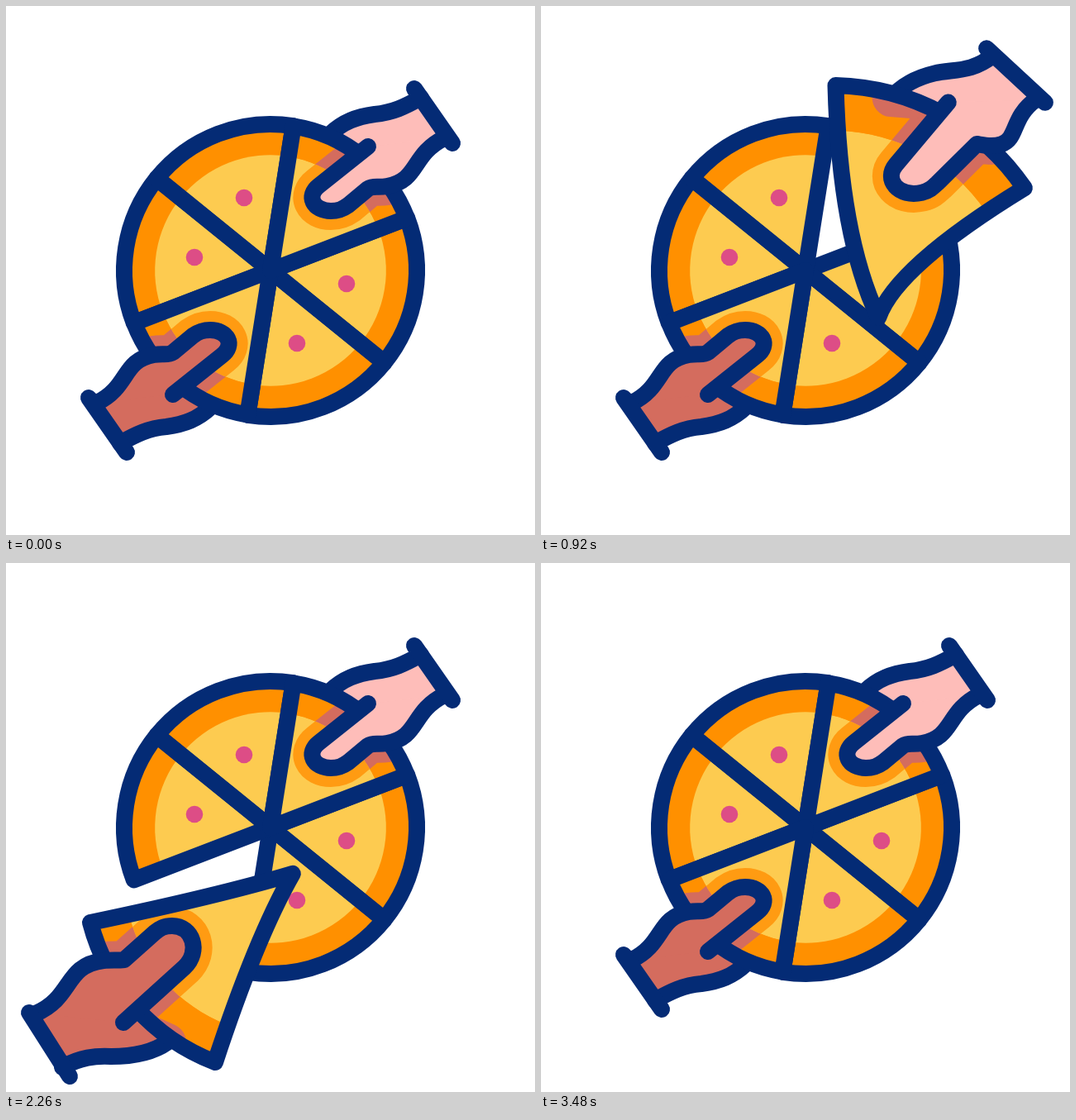
Animation of 640x640 px, one loop 3.6 s. Source, as an HTML page with a canvas:

```html
<!DOCTYPE html>
<html lang="en">
<head>
<meta charset="utf-8">
<title>Sharing a pizza</title>
<style>
html, body { margin: 0; width: 100%; height: 100%; overflow: hidden; background: #fff; }
canvas { display: block; width: 100vw; height: 100vh; }
</style>
</head>
<body>
<canvas width="640" height="640"></canvas>
<script>
const ctx = document.querySelector('canvas').getContext('2d');
const NAVY = '#042b75', CRUST = '#ff9000', CHEESE = '#fdcb50', GLOW = '#ff9b12';
const TAN = '#d46c5e', PINK = '#febdb9', TOPPING = '#dd4d86';
const LOOP = 3600, HALF = 1800, R = 177, INNER = 0.79;
const RAD = Math.PI / 180;

// Points: back of hand (7), cuff (2), thumb and palm (15), slice corners (2)
const REST = [
  392,155, 408,140, 424,134, 446,131, 468,129, 482,122, 502,111,
  494,100, 540,166,
  438,170, 379,217, 362,230, 372,248, 393,248, 402,248, 407,246, 414,241,
  438,221, 444,217, 450,220, 461,218, 500,211, 490,180, 530,160,
  347.6,145.5, 485,256.7];
const PULL_A = [
  424,84, 440,72, 460,67, 482,67, 505,67, 525,77, 556,62,
  550,52, 604,132,
  490,105, 411,164, 392,178, 405,204, 434,204, 443,204, 448,201, 455,197,
  512,162, 522,166, 530,170, 541,169, 562,167, 560,140, 594,126,
  362,54, 556,227];
const PULL_B = [
  445,60, 462,48, 485,43, 513,43, 532,44, 550,42, 572,30,
  563,19, 612,96,
  498,84, 424,151, 404,170, 414,201, 439,201, 449,201, 454,198, 460,193,
  497,160, 505,159, 513,160, 522,159, 570,153, 558,115, 604,95,
  387,36, 538,205];

// time, pull, turn, shift x, shift y, tip x, tip y
const KEYS_A = [
  [0, 0, 0, 0, 0, 0, 0],
  [200, .6, 0, 0, 0, 10, 45],
  [380, 1, 0, 0, 0, 23, 31],
  [600, 1, 4, -3, -27, -20, 10],
  [920, 1, -13.2, -2.5, -8, 45, 21],
  [1080, 1, -12, -3, -7, -20, -14],
  [1340, .62, 0, 2, -2, -15, -7],
  [1520, 0, 0, 0, 0, 0, 0]];
const KEYS_B = [
  [0, 0, 0, 0, 0, 0, 0],
  [230, .55, 0, 0, 0, -5, 75],
  [460, 1, 0, 0, 0, -23, 13],
  [600, 1, 0, 0, -4, -26, 4],
  [1080, 1, -12.2, 0, -1, -26, 17],
  [1340, .62, 0, 2, -2, -15, -7],
  [1520, 0, 0, 0, 0, 0, 0]];

const CRUMBS = [[320,252, 267,219], [320,276, 231,262], [312,290, 262,318]];
const DOTS = [[288,232], [228,304], [412,336], [352,408]];

const mix = (a, b, k) => a + (b - a) * k;
const mixPt = (p, q, k) => [mix(p[0], q[0], k), mix(p[1], q[1], k)];

// Monotone cubic through the keys
function sample(keys, t, c) {
  const last = keys.length - 1;
  if (t <= 0 || t >= keys[last][0]) return 0;
  let i = 0;
  while (t >= keys[i + 1][0]) i++;
  const slope = j => (keys[j + 1][c] - keys[j][c]) / (keys[j + 1][0] - keys[j][0]);
  const tangent = j => {
    if (j === 0 || j === last) return 0;
    const a = slope(j - 1), b = slope(j);
    return a * b <= 0 ? 0 : 2 * a * b / (a + b);
  };
  const h = keys[i + 1][0] - keys[i][0], u = (t - keys[i][0]) / h;
  const a = keys[i][c], b = keys[i + 1][c], s = u * u * (3 - 2 * u);
  return mix(a, b, s) + h * u * (1 - u) * (tangent(i) * (1 - u) - tangent(i + 1) * u);
}

function posePoints(pull, m, turn, dx, dy) {
  const px = (pull[14] + pull[16]) / 2, py = (pull[15] + pull[17]) / 2;
  const c = Math.cos(turn * RAD), s = Math.sin(turn * RAD), pts = [];
  for (let i = 0; i < REST.length; i += 2) {
    const x = mix(REST[i], pull[i], m) - px, y = mix(REST[i + 1], pull[i + 1], m) - py;
    pts.push([px + dx + x * c - y * s, py + dy + x * s + y * c]);
  }
  return pts;
}

function curve(path, pts, ...from) {
  for (const i of from) path.bezierCurveTo(...pts[i], ...pts[i + 1], ...pts[i + 2]);
}

function bulge(path, p, q, angle) {
  const dx = (q[0] - p[0]) * .357, dy = (q[1] - p[1]) * .357;
  const c = Math.cos(angle * RAD), s = Math.sin(angle * RAD);
  path.bezierCurveTo(
    p[0] + dx * c + dy * s, p[1] - dx * s + dy * c,
    q[0] - dx * c + dy * s, q[1] - dx * s - dy * c, ...q);
}

function fill(path, color) {
  ctx.fillStyle = color;
  ctx.fill(path);
}

function stroke(path, color = NAVY, width = 20) {
  if (width <= 0) return;
  ctx.strokeStyle = color;
  ctx.lineWidth = width;
  ctx.stroke(path);
}

function line(p, q) {
  const path = new Path2D();
  path.moveTo(...p);
  path.lineTo(...q);
  return path;
}

function sector(r, start) {
  const path = new Path2D();
  path.moveTo(320, 320);
  path.arc(320, 320, r, start * RAD, (start + 60) * RAD);
  path.closePath();
  return path;
}

function drawPizza() {
  const starts = [-21, 39, 159, 219];
  for (const a of starts) {
    fill(sector(R, a), CRUST);
    fill(sector(R * INNER, a), CHEESE);
  }
  for (const a of starts) stroke(sector(R, a));
  for (const [x, y] of DOTS) {
    const dot = new Path2D();
    dot.arc(x, y, 10.3, 0, 7);
    fill(dot, TOPPING);
  }
}

function drawCrumbs(t, drop) {
  const u = (t - 1220) / 450;
  if (u <= 0 || u >= 1) return;
  const ease = v => 1 - (1 - Math.max(0, v)) ** 3;
  const width = 20 * Math.min(1, u * 8, (1 - u) * 5);
  for (const [x0, y0, x1, y1] of CRUMBS) {
    const a = [x0, y0 + drop], b = [x1, y1 + drop];
    stroke(line(mixPt(a, b, ease(u - .13)), mixPt(a, b, ease(u))), TOPPING, width);
  }
}

function drawPiece(pull, keys, t, skin) {
  const [m, turn, dx, dy, tx, ty] = [1, 2, 3, 4, 5, 6].map(c => sample(keys, t, c));
  const p = posePoints(pull, m, turn, dx, dy);
  const c1 = p[24], c2 = p[25], angle = mix(30, 27, m);
  const down = [-(c2[1] - c1[1]) * .866, (c2[0] - c1[0]) * .866];
  const mid = mixPt(c1, c2, .5);
  const apex = [mid[0] + down[0], mid[1] + down[1]];
  const tip = [apex[0] + tx, apex[1] + ty];

  const back = new Path2D();
  back.moveTo(...p[0]);
  curve(back, p, 1, 4);
  const backFill = new Path2D(back);
  for (const i of [7, 8, 23, 17]) backFill.lineTo(...p[i]);

  const front = new Path2D();
  front.moveTo(...p[9]);
  front.lineTo(...p[10]);
  curve(front, p, 11, 14);
  front.lineTo(...p[17]);
  curve(front, p, 18, 21);

  const slice = new Path2D();
  slice.moveTo(...tip);
  slice.quadraticCurveTo(...mixPt(c1, apex, .7), ...c1);
  bulge(slice, c1, c2, angle);
  slice.quadraticCurveTo(...mixPt(c2, apex, .7), ...tip);
  slice.closePath();

  const cheese = new Path2D();
  const i1 = mixPt(apex, c1, INNER), i2 = mixPt(apex, c2, INNER);
  cheese.moveTo(...i1);
  bulge(cheese, i1, i2, angle);
  cheese.lineTo(i2[0] + down[0] * 2, i2[1] + down[1] * 2);
  cheese.lineTo(i1[0] + down[0] * 2, i1[1] + down[1] * 2);
  cheese.closePath();

  const knuckles = line(p[0], mixPt(p[0], p[9], .4));
  const halo = color => {
    stroke(front, color, 46);
    stroke(knuckles, color, 46 * Math.max(0, m * 2 - 1));
  };

  fill(backFill, skin);
  stroke(back);

  ctx.save();
  ctx.clip(slice);
  fill(slice, CRUST);
  halo(TAN);
  ctx.clip(cheese);
  fill(cheese, CHEESE);
  halo(GLOW);
  ctx.restore();
  stroke(slice);

  fill(front, skin);
  stroke(front);
  stroke(line(p[7], p[8]));
}

function flipped(draw) {
  ctx.save();
  ctx.translate(640, 640);
  ctx.rotate(Math.PI);
  draw();
  ctx.restore();
}

function render(time) {
  const t = time % LOOP;
  ctx.fillStyle = '#fff';
  ctx.fillRect(0, 0, 640, 640);
  ctx.lineCap = ctx.lineJoin = 'round';
  drawPizza();
  drawCrumbs(t, 0);
  flipped(() => drawCrumbs(t - HALF, 15));
  const upper = () => drawPiece(PULL_A, KEYS_A, t, PINK);
  const lower = () => flipped(() => drawPiece(PULL_B, KEYS_B, t - HALF, TAN));
  if (t < HALF) { lower(); upper(); } else { upper(); lower(); }
}

const begin = performance.now();
function tick() {
  render(performance.now() - begin);
  requestAnimationFrame(tick);
}
tick();
</script>
</body>
</html>
```
